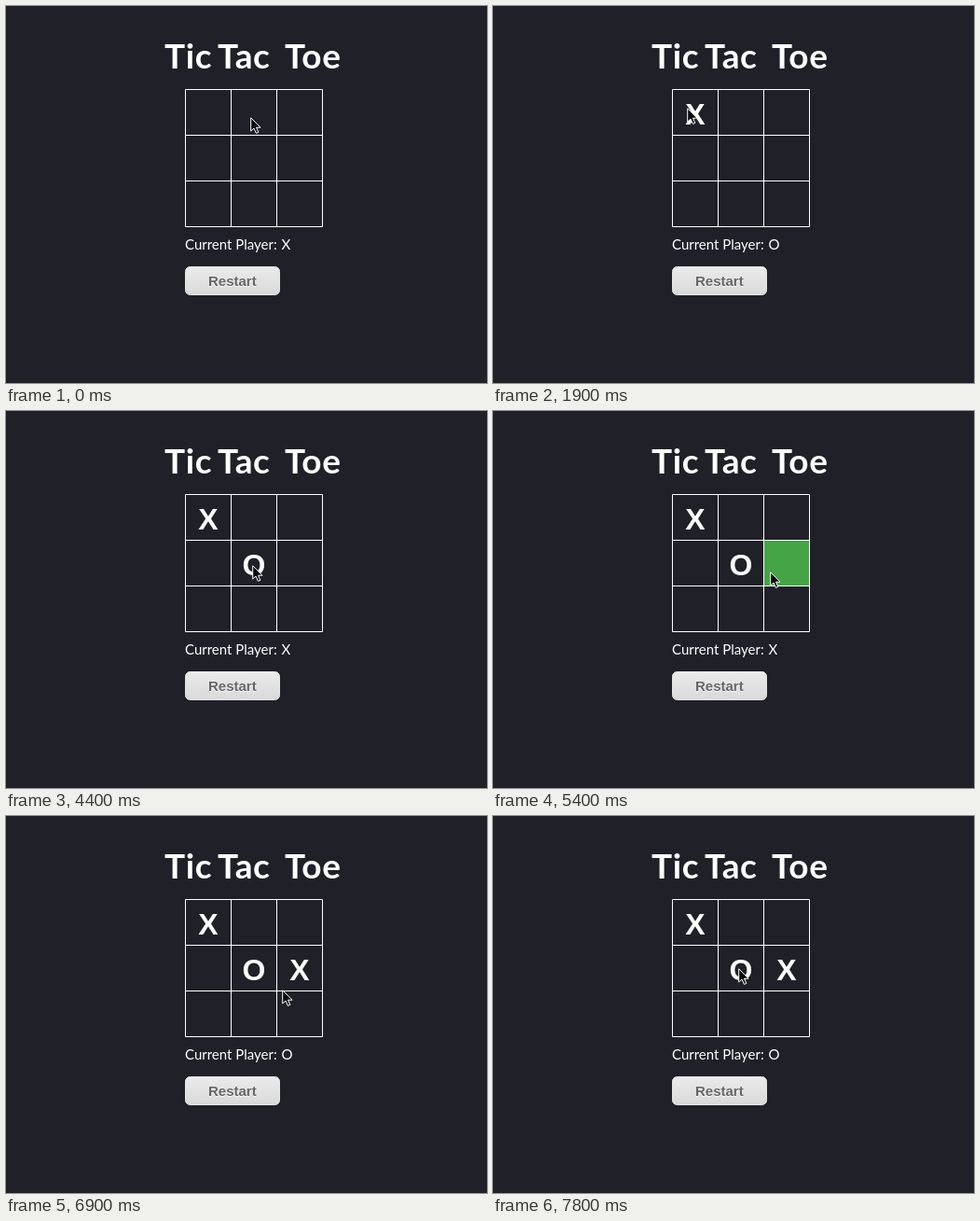
Recreate the animation shown at these times as an HTML page. Size 516 by 404 pixels, loop 8000 ms.

```html
<!DOCTYPE html>
<html lang="en">
<head>
<meta charset="utf-8">
<title>Tic Tac Toe</title>
<style>
  html, body { margin: 0; width: 100%; height: 100%; overflow: hidden; background: #202128; }
  svg { display: block; width: 516px; height: 404px; }
  text { fill: #fff; font-family: Lato, sans-serif; }
  .title { font-size: 37px; font-weight: 700; letter-spacing: .6px; }
  .status { font-size: 15px; }
  .mark { font: 700 32px "Liberation Sans", Arial, sans-serif; text-anchor: middle; }
  .button { font: 700 15px "Liberation Sans", Arial, sans-serif; fill: #666; text-shadow: 0 1px 0 #fff; }
</style>
</head>
<body>
<svg viewBox="0 0 516 404">
  <defs>
    <linearGradient id="silver" x2="0" y2="1">
      <stop stop-color="#ebebeb"/>
      <stop offset="1" stop-color="#d9d9d9"/>
    </linearGradient>
  </defs>
  <g class="title">
    <text x="170" y="67">Tic</text>
    <text x="227" y="67">Tac</text>
    <text x="299" y="67">Toe</text>
  </g>
  <rect id="hover" width="49" height="49" fill="#45a445"/>
  <path d="M192.5 89.5h147v147h-147zM241.5 89.5v147M290.5 89.5v147M192.5 138.5h147M192.5 187.5h147" fill="none" stroke="#fff"/>
  <g id="marks"></g>
  <text class="status" x="192" y="261">Current Player:</text>
  <text class="status" id="player" x="295.5" y="261"></text>
  <rect x="192.5" y="279.5" width="101" height="30" rx="5" fill="url(#silver)" stroke="#e4e4e4"/>
  <text class="button" x="217" y="300">Restart</text>
  <path id="cursor" d="M.7 .8V15L4 12L6.4 17.4L8.8 16.3L6.5 11.2H11Z" fill="#08080a" stroke="#fff" stroke-linejoin="round"/>
</svg>
<script>
const $ = id => document.getElementById(id);
const LOOP = 8000, LEFT = 192, TOP = 89, CELL = 49;

// Pointer stops: time, x, y
const stops = [
  [0, 262, 119], [600, 236, 113], [700, 216, 110], [800, 208, 109],
  [2600, 213, 111], [2700, 226, 116], [2800, 243, 124], [2900, 255, 135], [3000, 262, 153], [3100, 264, 165],
  [5100, 274, 169], [5200, 283, 173],
  [5400, 297, 172], [5500, 308, 180], [5600, 316, 193], [5700, 311, 195],
  [5900, 263, 178], [6000, 310, 183],
  [6900, 296, 186], [7000, 258, 211], [7100, 216, 234],
  [7300, 216, 229], [7400, 217, 217], [7500, 222, 200], [7600, 231, 183], [7700, 249, 171], [7800, 263, 163]
];

const moves = [
  { at: 1900, cell: 0, mark: "X" },
  { at: 4400, cell: 4, mark: "O" },
  { at: 6400, cell: 5, mark: "X" }
];

for (const m of moves) {
  m.el = document.createElementNS("http://www.w3.org/2000/svg", "text");
  m.el.setAttribute("class", "mark");
  m.el.setAttribute("x", LEFT + CELL * (m.cell % 3) + 25);
  m.el.setAttribute("y", TOP + CELL * Math.floor(m.cell / 3) + 38);
  m.el.textContent = m.mark;
  $("marks").append(m.el);
}

function draw(now) {
  const t = now % LOOP;
  const [, x, y] = stops.findLast(s => s[0] <= t);
  const played = moves.filter(m => m.at <= t);
  const col = Math.floor((x - LEFT) / CELL), row = Math.floor((y - TOP) / CELL);
  const taken = played.some(m => m.cell === row * 3 + col);

  for (const m of moves) m.el.style.display = m.at <= t ? "" : "none";
  $("player").textContent = played.length % 2 ? "O" : "X";
  $("hover").setAttribute("x", LEFT + col * CELL + .5);
  $("hover").setAttribute("y", TOP + row * CELL + .5);
  // The pointer rests on the board without a highlight until it first moves
  $("hover").style.display = t < 600 || taken ? "none" : "";
  $("cursor").setAttribute("transform", `translate(${x} ${y})`);
  requestAnimationFrame(draw);
}
draw(0);
</script>
</body>
</html>
```
